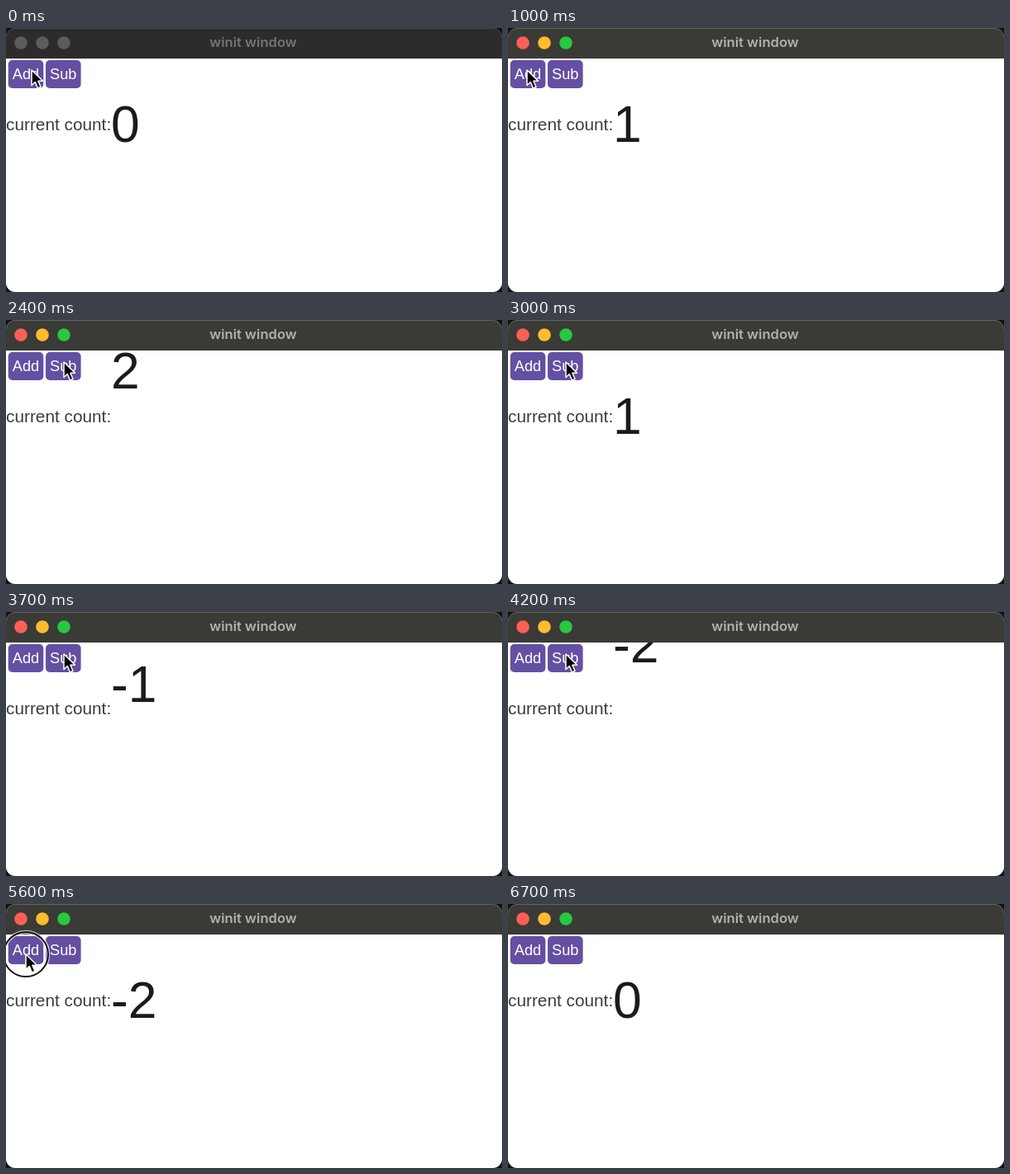
These frames come from a looping animation (600 px wide and 320 px high, 6800 ms). An HTML page:

```html
<!DOCTYPE html>
<html lang="en">
<head>
<meta charset="utf-8">
<title>winit window</title>
<style>
  html, body { margin: 0; width: 100%; height: 100%; overflow: hidden; background: #111; }
  svg { display: block; width: 600px; height: 320px; }
  text { font-family: "Liberation Sans", Arial, sans-serif; white-space: pre; }
  .bar { fill: #3a3a36; }
  .edge { stroke: #60605c; }
  .title { font: 600 16.6px Inter, sans-serif; fill: #b1b1ae; text-anchor: middle; }
  .red { fill: #fe5f57; }
  .yellow { fill: #febc2e; }
  .green { fill: #28c840; }
  .idle .bar { fill: #2d2b2c; }
  .idle .edge { stroke: #4b494a; }
  .idle .title { fill: #757374; }
  .idle circle { fill: #5d5b5c; }
  .button rect { fill: #644fa2; }
  .button text { font-size: 18.2px; fill: #fff; }
  .label { font-size: 20.8px; fill: #3d3947; }
  .count { font-size: 62.4px; fill: #1b1a1d; }
</style>
</head>
<body>
<svg viewBox="0 0 600 320">
  <defs>
    <clipPath id="content"><rect y="37" width="600" height="283"/></clipPath>
  </defs>
  <rect width="600" height="320" fill="#111"/>
  <rect y="20" width="600" height="300" rx="11" fill="#fff"/>
  <g id="frame">
    <path class="bar" d="M0 37V11A11 11 0 0 1 11 0H589A11 11 0 0 1 600 11V37Z"/>
    <path class="edge" d="M.5 11A10.5 10.5 0 0 1 11 .5H589A10.5 10.5 0 0 1 599.5 11" fill="none"/>
    <circle class="red" cx="18" cy="18" r="7.8"/>
    <circle class="yellow" cx="44" cy="18" r="7.8"/>
    <circle class="green" cx="70" cy="18" r="7.8"/>
    <text class="title" x="299" y="23">winit window</text>
  </g>
  <g class="button">
    <rect x="2.7" y="39" width="42.6" height="34" rx="5"/>
    <text x="7.8" y="62">Add</text>
    <rect x="48" y="39" width="42.6" height="34" rx="5"/>
    <text x="53" y="62">Sub</text>
  </g>
  <text class="label" x="0" y="124">current count:</text>
  <g clip-path="url(#content)">
    <text class="count" id="count" x="127" y="137.5">0</text>
  </g>
  <g id="pointer">
    <g id="ring" fill="none">
      <circle r="27" stroke="#fff" stroke-opacity=".7" stroke-width="4.5"/>
      <circle r="27" stroke="#111" stroke-width="2"/>
    </g>
    <path d="M0 0V18.5L4.3 14.5L7.4 22L11 20.5L7.9 13.2H13.6Z"
      fill="#000" stroke="#fff" stroke-width="1.5" stroke-linejoin="round"/>
  </g>
</svg>
<script>
  const LOOP = 6800, STEP = 100, JUMP = 600, HEIGHT = 80, PRESS = 200, FOCUS = 800;

  // [time of release, new count]
  const clicks = [
    [1000, 1], [1932, 2], [3000, 1], [3330, 0],
    [3640, -1], [3960, -2], [5680, -1], [6050, 0]
  ];

  // [start, end, x, y]
  const moves = [
    [0, 0, 31, 51], [300, 600, 23, 51], [1950, 2300, 70, 51],
    [4500, 5300, 24, 61], [6200, 6600, -20, 36]
  ];

  const byId = id => document.getElementById(id);
  const frame = byId("frame"), count = byId("count");
  const pointer = byId("pointer"), ring = byId("ring");
  const ease = p => p * p * (3 - 2 * p);

  function pointerAt(t) {
    let x = 0, y = 0;
    for (const [start, end, toX, toY] of moves) {
      if (t < start) break;
      const p = t >= end ? 1 : ease((t - start) / (end - start));
      x += (toX - x) * p;
      y += (toY - y) * p;
    }
    return [x, y];
  }

  function draw(t) {
    const last = clicks.filter(([at]) => at <= t).pop() || [-JUMP, 0];
    const p = Math.min((t - last[0]) / JUMP, 1);
    const lift = 4 * p * (1 - p) * HEIGHT;
    const pressed = clicks.some(([at]) => t >= at - PRESS && t < at);

    frame.classList.toggle("idle", t < FOCUS);
    count.textContent = last[1];
    count.setAttribute("y", 137.5 - lift);
    pointer.setAttribute("transform", `translate(${pointerAt(t)})`);
    ring.style.display = pressed ? "" : "none";
  }

  const origin = performance.now();
  function tick() {
    const t = (performance.now() - origin) % LOOP;
    draw(Math.floor(t / STEP) * STEP);
    requestAnimationFrame(tick);
  }
  tick();
</script>
</body>
</html>
```
